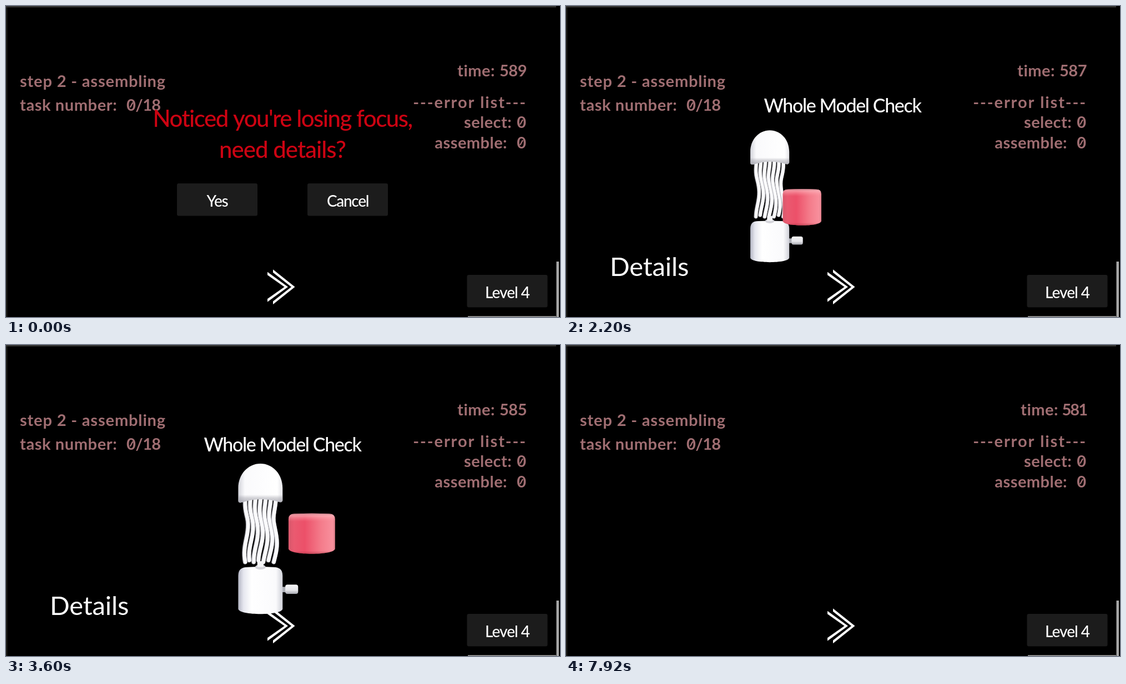
These frames come from a looping animation (998 px wide and 561 px high, 8 s). An HTML page with a canvas:

```html
<!DOCTYPE html>
<html lang="en">
<head>
<meta charset="utf-8">
<title>Assembly task</title>
<style>
  html, body { margin: 0; width: 100%; height: 100%; overflow: hidden; background: #000; }
  canvas { display: block; }
</style>
</head>
<body>
<canvas id="stage" width="998" height="561"></canvas>
<script>
const ctx = document.getElementById('stage').getContext('2d');
const LOOP = 8000, OPEN = 1840, CLOSE = 4360;
const PINK = '#a06e72', RED = '#cc0312', WHITE = '#fff';

function text(str, x, y, size, color, { align = 'left', gap = 0, weight = 500 } = {}) {
  ctx.font = `${weight} ${size}px Lato, "Open Sans", sans-serif`;
  ctx.letterSpacing = gap + 'px';
  ctx.textAlign = align;
  ctx.fillStyle = color;
  ctx.fillText(str, x, y);
}

function label(str, x, y, align, gap) {
  text(str, x, y, 29, PINK, { align, gap, weight: 700 });
}

function zeroSlash(x, y) {
  line([[x - 2.5, y + 4.5], [x + 2.5, y - 4.5]], 2.5, PINK);
}

function line(points, width, color) {
  ctx.beginPath();
  points.forEach(([x, y]) => ctx.lineTo(x, y));
  ctx.lineWidth = width;
  ctx.strokeStyle = color;
  ctx.stroke();
}

function button(str, x, y, gap) {
  ctx.fillStyle = '#1c1c1c';
  ctx.beginPath();
  ctx.roundRect(x, y, 145, 58.5, 3);
  ctx.fill();
  text(str, x + 72.5, y + 42, 28, WHITE, { align: 'center', gap });
}

function gradient(x0, y0, x1, y1, stops) {
  const g = ctx.createLinearGradient(x0, y0, x1, y1);
  stops.forEach(([at, color]) => g.addColorStop(at, color));
  return g;
}

function border() {
  ctx.fillStyle = '#1a1a17';
  ctx.fillRect(0, 0, 2.5, 561);
  ctx.fillStyle = '#363634';
  ctx.fillRect(0, 0, 991, 2.5);
  ctx.fillStyle = '#a8a8a8';
  ctx.fillRect(991.5, 461, 4.5, 100);
  ctx.fillRect(832, 559.5, 159, 1.5);
}

function status(t) {
  label('step 2 - assembling', 25, 146, 'left', 0.85);
  label('task number:', 25, 189, 'left', 0.6);
  label('0/18', 217, 189, 'left', -0.6);
  zeroSlash(226, 178.5);

  const left = 589 - Math.floor((t + 500) / 1000);
  const narrow = left % 10 === 1;
  label('time:', narrow ? 887 : 881, 127, 'right', 0.5);
  label(String(left), 938, 127, 'right', narrow ? -2 : -0.5);

  label('---error list---', 938, 184, 'right', 1.9);
  label('select:', 911, 220, 'right', 0.4);
  label('assemble:', 903, 257, 'right', 0.45);
  for (const y of [220, 257]) {
    label('0', 937, y, 'right', 0);
    zeroSlash(928.5, y - 10.5);
  }
}

// Arrow head with vertically cut ends
function arrow(x, tip, half) {
  const mid = 506.7, thick = 5.5;
  ctx.beginPath();
  ctx.moveTo(x, mid - half);
  ctx.lineTo(tip, mid);
  ctx.lineTo(x, mid + half);
  ctx.lineTo(x, mid + half - thick);
  ctx.lineTo(tip - 6.5, mid);
  ctx.lineTo(x, mid - half + thick);
  ctx.fillStyle = WHITE;
  ctx.fill();
}

function dialog() {
  text("Noticed you're losing focus,", 498, 218, 42, RED, { align: 'center', gap: -1.5 });
  text('need details?', 498, 274, 42, RED, { align: 'center', gap: -1 });
  button('Yes', 308, 320, -1.2);
  button('Cancel', 543, 320, -1.3);
}

// Cylinder with rounded top, in model units
function drum(cx, top, w, h, r, fill) {
  const l = cx - w / 2, right = cx + w / 2, b = top + h;
  ctx.beginPath();
  ctx.moveTo(l, top + r);
  ctx.quadraticCurveTo(l, top + 0.01, l + r, top + 0.01);
  ctx.quadraticCurveTo(cx, top - 0.01, right - r, top + 0.01);
  ctx.quadraticCurveTo(right, top + 0.01, right, top + r);
  ctx.lineTo(right, b - 0.12);
  ctx.bezierCurveTo(right - 0.03, b + 0.03, l + 0.03, b + 0.03, l, b - 0.12);
  ctx.closePath();
  ctx.fillStyle = fill;
  ctx.fill();
}

function strands(turn) {
  ctx.lineCap = ctx.lineJoin = 'round';
  for (let i = 0; i < 7; i++) {
    const x = (i - 3) * 0.115, pts = [];
    for (let s = 0; s <= 1.001; s += 0.05) {
      const sway = 0.05 * Math.sin(6.5 * s - 1 - i * 0.35 - turn) * Math.min(1, s * 3);
      pts.push([x * (1 - 0.1 * s) + sway, 0.8 + s * (1.42 - 0.04 * (i % 2))]);
    }
    line(pts, 0.098, '#b2b2b8');
    line(pts.map(([px, py]) => [px + 0.006, py]), 0.078, '#fafafc');
  }
  ctx.lineCap = 'butt';
  ctx.lineJoin = 'miter';
}

function bell() {
  ctx.beginPath();
  ctx.moveTo(-0.5, 0.84);
  ctx.lineTo(-0.5, 0.55);
  ctx.bezierCurveTo(-0.5, 0.24, -0.28, 0, 0, 0);
  ctx.bezierCurveTo(0.28, 0, 0.5, 0.24, 0.5, 0.55);
  ctx.lineTo(0.5, 0.83);
  ctx.quadraticCurveTo(0.48, 0.89, 0.4, 0.86);
  ctx.quadraticCurveTo(0, 0.74, -0.4, 0.87);
  ctx.quadraticCurveTo(-0.49, 0.9, -0.5, 0.84);
  ctx.fillStyle = gradient(-0.5, 0, 0.5, 0,
    [[0, '#d2d3da'], [0.15, '#fafafc'], [0.88, '#fff'], [1, '#e4e4e8']]);
  ctx.fill();
  ctx.fillStyle = gradient(0, 0.7, 0, 0.88,
    [[0, 'rgba(150,150,160,0)'], [0.4, 'rgba(150,150,160,.4)'], [1, 'rgba(150,150,160,.7)']]);
  ctx.fill();
}

function base() {
  ctx.fillStyle = '#aeb0b8';
  ctx.fillRect(0.48, 2.78, 0.12, 0.12);
  ctx.fillStyle = gradient(0, 2.73, 0, 2.94, [[0, '#f6f6f8'], [0.6, '#e6e6ea'], [1, '#a5a6ae']]);
  ctx.beginPath();
  ctx.roundRect(0.56, 2.73, 0.29, 0.21, 0.05);
  ctx.fill();
  drum(0, 2.325, 1, 1.075, 0.2, gradient(-0.5, 0, 0.5, 0,
    [[0, '#b4b6c4'], [0.12, '#e6e7ef'], [0.3, '#fff'], [0.85, '#fafafc'], [1, '#cfd0d8']]));
  ctx.fillStyle = '#d4d4da';
  ctx.beginPath();
  ctx.ellipse(0, 2.335, 0.12, 0.055, 0, 0, Math.PI * 2);
  ctx.fill();
  ctx.fillStyle = '#f4f4f6';
  ctx.fillRect(-0.07, 2.2, 0.14, 0.13);
}

// The red part slides out of the base; the clip hides what is still inside it
function redPart(k) {
  const x = 1.16 - 0.67 * k, y = 2.865 - 1.285 + 0.81 * k;
  const w = 1.05 - 0.12 * k, h = 0.92 + 0.05 * k;
  const edge = 0.25 + 0.36 * (k - 1);
  ctx.save();
  ctx.beginPath();
  ctx.rect(-3, -3, 8, 5.5);
  ctx.rect(edge, 2.49, 5, 3);
  ctx.clip();
  drum(x, y - h / 2, w, h, 0.13, gradient(x - w / 2, 0, x + w / 2, 0,
    [[0, '#d9586c'], [0.12, '#ea5a70'], [0.35, '#ec5069'], [0.7, '#f47c8b'], [0.95, '#f8909d'], [1, '#dc7c88']]));
  drum(x, y - h / 2, w, h, 0.13, gradient(0, y - h / 2, 0, y + h / 2,
    [[0, 'rgba(190,130,138,.9)'], [0.06, 'rgba(255,190,196,.55)'], [0.2, 'rgba(255,150,160,0)'],
     [0.92, 'rgba(150,40,55,0)'], [1, 'rgba(150,40,55,.5)']]));
  ctx.restore();
}

function model(t) {
  const k = Math.exp(-(t - 2000) / 285);
  const size = 80 - 20 * k;
  ctx.save();
  ctx.translate(459 - 186 * k, 350 - 13 * k - 1.7 * size);
  ctx.scale(size, size);
  strands(k * 2);
  bell();
  base();
  redPart(k);
  ctx.restore();
}

function details(t) {
  text('Whole Model Check', 498, 192, 34, WHITE, { align: 'center', gap: -1.35 });
  text('Details', 79, 487, 47, WHITE, { gap: -0.1, weight: 400 });
  model(t);
}

function draw(t) {
  ctx.fillStyle = '#000';
  ctx.fillRect(0, 0, 998, 561);
  border();
  status(t);
  arrow(471, 508, 27);
  arrow(481, 520.5, 31.5);
  button('Level 4', 830.5, 485, -1);
  if (t < OPEN) dialog();
  else if (t < CLOSE) details(t);
}

const start = performance.now();
function tick(now) {
  draw(Math.max(0, now - start) % LOOP);
  requestAnimationFrame(tick);
}
draw(0);
requestAnimationFrame(tick);
</script>
</body>
</html>
```
